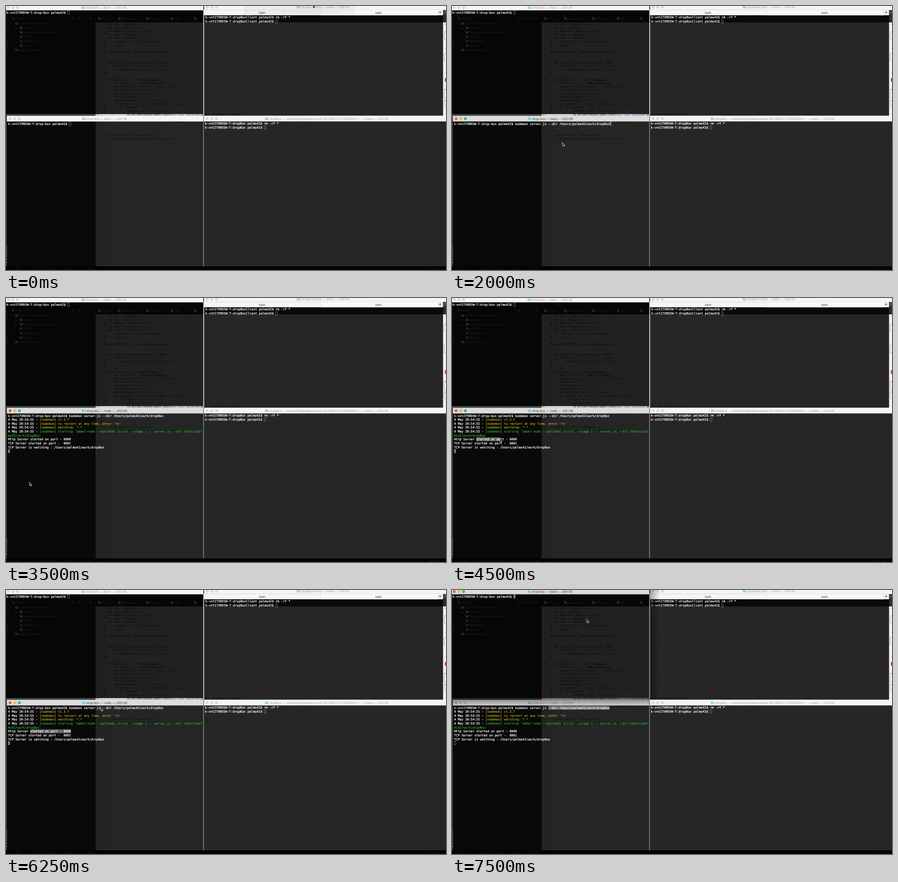
Write an HTML page that moves like this. It is 967 by 579 pixels and loops after 8000 ms.

```html
<!DOCTYPE html>
<html lang="en">
<head>
<meta charset="utf-8">
<title>Terminals</title>
<style>
html, body { margin: 0; width: 100%; height: 100%; overflow: hidden; background: #000; }
svg { display: block; width: 967px; height: 579px; }
text { white-space: pre; text-rendering: geometricPrecision; }
.term { font: 6.754px "DejaVu Sans Mono", monospace; fill: #fff; }
.white { stroke: #fff; stroke-width: .22px; }
.code { font: 5.9px "DejaVu Sans Mono", monospace; fill: #060606; }
.ui { font: 7.05px "Liberation Sans", Arial, sans-serif; }
.tree { font: 5.8px "Liberation Sans", Arial, sans-serif; fill: #222; }
</style>
</head>
<body>
<svg viewBox="0 0 967 579" xmlns="http://www.w3.org/2000/svg">
  <defs>
    <linearGradient id="shadeDown" x2="0" y2="1">
      <stop offset="0" stop-opacity=".5"/><stop offset="1" stop-opacity="0"/>
    </linearGradient>
    <linearGradient id="shadeRight">
      <stop offset="0" stop-opacity=".35"/><stop offset="1" stop-opacity="0"/>
    </linearGradient>
  </defs>
  <g id="desk"></g>
  <g id="live"></g>
</svg>
<script>
const LOOP = 8000, STEP = 250;
const CW = 4.066, ROW = 8.65, CODE_ROW = 7.594;
const USER = 'pelmo42', HOST = 'k-vnt27XRD5W-T';
const prompt = dir => `${HOST}:${dir} ${USER}$ `;

const esc = s => s.replace(/&/g, '&amp;').replace(/</g, '&lt;');
const rect = (x, y, w, h, fill, extra = '') =>
  `<rect x="${x}" y="${y}" width="${w}" height="${h}" fill="${fill}" ${extra}/>`;
const text = (x, y, cls, s, extra = '') =>
  `<text x="${x}" y="${y}" class="${cls}" ${extra}>${esc(s)}</text>`;
const dot = (x, y, r, fill, extra = '') =>
  `<circle cx="${x}" cy="${y}" r="${r}" fill="${fill}" ${extra}/>`;

// ---- editor showing through the terminals ----
const CODE = `let net = require('net');
let fs = require('fs');
let mkdirp = require('mkdirp');
let path = require('path');
let argv = require('yargs')
    .default('dir', process.cwd())
    .argv;

const ROOT_DIR = path.resolve(argv.dir);


var client = net.connect({port: 8001},
    function() { //'connect' listener
        console.log('connected to server!')

    });
client.on('data', function(data) {
    let dataJson =  JSON.parse(data);
    console.log('Received' +  dataJson.path);
    let action = dataJson.action;
    let type = dataJson.type;
    console.log(dataJson);
    console.log(dataJson.contents);
    if (action == 'create' || action == 'change') {
        if (type == 'file') {
            console.log("I am here");
            fs.writeFileSync(path.join(ROOT_DIR, dataJson.path), dataJson.contents)


        }
    }
});
client.on('end', function() {
    console.log('disconnected from server')
});`.split('\n');

const TOKENS = [
  [/^\/\/.*/, '#161616'],
  [/^(['"]).*?\1/, '#07150b'],
  [/^(let|const|var|function|if)\b/, '#050512'],
  [/^dataJson(\.\w+)?/, '#101022'],
  [/^(\w+|\s+|.)/, '']
];

function highlight(line) {
  let out = '';
  while (line) {
    const [re, color] = TOKENS.find(([r]) => r.test(line));
    const word = line.match(re)[0];
    out += color ? `<tspan fill="${color}">${esc(word)}</tspan>` : esc(word);
    line = line.slice(word.length);
  }
  return out;
}

function editor() {
  let s = '';
  CODE.forEach((line, i) => {
    const y = (42 + i * CODE_ROW).toFixed(2);
    if (i === 27 || i === 28) return;
    s += text(206, y, 'code', String(i + 1), 'text-anchor="end" style="fill:#3c1316"');
    if (i !== 26) s += `<text x="223" y="${y}" class="code">${highlight(line)}</text>`;
  });
  const [a, b] = CODE[26].split('ROOT_DIR');
  const [c, d] = b.split('dataJson.path');
  s += `<text x="223" y="239.5" class="code">${a}<tspan fill="#5b4a9c">ROOT_DIR</tspan>${c}` +
       `<tspan fill="#3c4a8c">dataJson</tspan>.path${d}</text>`;
  s += rect(318, 164, 16, .5, '#050505') + rect(334, 171.6, 15, .5, '#050505');
  [20, 47, 62, 108, 187].forEach(y => s += rect(217, y + 35, 3, 7, '#141414'));
  s += text(361, 255, 'code', 'contents)');
  return s;
}

function projectTree() {
  const items = ['drop-box (~/work/drop-box)', '.settings', 'node_modules (library home)',
    'client.js', 'package.json', 'server.js', 'External Libraries'];
  const icons = ['#262626', '#262626', '#262626', '#2b1c0c', '#10202b', '#2b1c0c', '#262626'];
  let s = '';
  items.forEach((name, i) => {
    const y = 38.3 + i * 9.7, x = i === 0 || i === 6 ? 20 : 30;
    s += rect(x, y - 2.4, 6.5, 5, icons[i], 'rx="1"') + text(x + 8.5, y + 2, 'tree', name);
    if (i < 3) s += text(x - 10, y + 2, 'tree', i ? '▶' : '▼', 'style="font-size:4.5px"');
  });
  [148, 160, 174, 186].forEach(x =>
    s += dot(x, 27, 2.2, 'none', 'stroke="#262626" stroke-width=".8"'));
  s += rect(13, 25, 5, 4, '#222') + text(21, 29, 'tree', 'Project');
  const tabs = ['client.js', 'package.json', 'server.js', 'util.js'];
  [202, 246, 308, 362, 413].forEach((x, i) =>
    s += rect(x, 24.5, 6, 6, '#2c220f') + text(x + 8, 29.5, 'tree', tabs[i] || ''));
  s += text(0, 0, 'tree', '1: Project', 'transform="translate(5 52) rotate(-90)"');
  s += text(0, 0, 'tree', '7: Structure', 'transform="translate(5 105) rotate(-90)"');
  return s;
}

function desk() {
  let s = rect(0, 0, 967, 579, '#040404');
  // top left
  s += rect(0, 8, 434, 229, '#060606') + rect(197, 36, 237, 201, '#212121') + rect(197, 36, 23, 201, '#1f1f1f');
  s += rect(0, 237, 197, 5, '#4a4a4a') + rect(197, 237, 237, 5, '#d2d2d2');
  // bottom left
  s += rect(0, 242, 1.6, 329, '#4a4a4a');
  s += rect(2, 252, 195, 319, '#090909') + rect(197, 252, 237, 319, '#252525') + rect(197, 252, 24, 319, '#232323');
  // right
  s += rect(435, 20, 525.5, 16, '#0a0a0a') + rect(435, 36, 525.5, 205, '#262626');
  s += rect(435, 252, 532, 319, '#262626');
  s += rect(960.5, 8, 6.5, 28, '#2a2a2a') + dot(965, 14, 2.5, 'none', 'stroke="#999"');
  s += rect(960.5, 36, 6.5, 205, '#f1f1f1');
  [[39, '#d9a04a'], [56, '#c9b34a'], [93, '#d8c36a'], [146, '#d9b85a'], [182, '#c080c0'], [205, '#c08fd0'], [222, '#c9b34a']]
    .forEach(([y, c]) => s += rect(964, y, 3, 1.2, c));
  [[60, 12], [104, 16], [183, 18], [208, 10]].forEach(([y, h]) =>
    s += rect(963, y, 6, h, 'none', 'stroke="#8a8a8a" stroke-width=".7"'));
  s += rect(964.5, 158, 2.5, 8, '#d8322c') + rect(965, 280, 2, 8, '#4a1014');
  s += editor() + projectTree();
  s += rect(433.6, 8, 1.8, 232, '#dedede') + rect(433.4, 253, 1.5, 318, '#8f8f8f');
  // bottom edge
  s += rect(0, 571, 967, 8, '#030303');
  [[16, '4: Run'], [60, '6: TODO   Terminal'], [130, 'Version'], [174, '9: Log'], [926, 'Event Log']]
    .forEach(([x, w]) => s += text(x, 578, 'tree', w));
  s += text(0, 0, 'tree', '2: Favorites', 'transform="translate(3 557) rotate(-90)" style="fill:#666"');
  s += rect(0, 560.5, 2, 3, '#c87a20');
  // right title bars and tabs
  s += titleBar(435.2, -4, 531.8, 12.8, 442, 2.5, 639, 'dropBoxClient — bash — 128×26');
  s += rect(435.2, 8.8, 525.3, 11.5, '#f5f5f5') + rect(691.5, 8.8, 257, 11.5, '#f9f9f9');
  s += rect(691.3, 8.8, .6, 11.5, '#d2d2d2') + rect(948, 8.8, .6, 11.5, '#d2d2d2');
  [563, 819].forEach(x => s += text(x, 16.5, 'ui', 'bash', 'text-anchor="middle" style="font-size:6.4px" fill="#333"'));
  s += rect(951.2, 13.5, 5.6, .9, '#333') + rect(953.55, 11.1, .9, 5.6, '#333');
  s += titleBar(434.6, 240.5, 532.4, 12.6, 442, 247, 569,
    `dropBox — ${USER}@gridqueuehost-20746513-27-60382947:~ — bash — 131×38`);
  // right prompts
  const client = prompt('dropBoxClient'), server = prompt('dropBox');
  s += text(438, 27.4, 'term white', client + 'rm -rf *') + text(438, 36.1, 'term white', client);
  s += caret(438 + client.length * CW, 29.6, false);
  s += text(437, 260.3, 'term white', server + 'rm -rf *') + text(437, 268.9, 'term white', server);
  s += caret(437 + server.length * CW, 262.4, false);
  return s;
}

// ---- window parts ----
function titleBar(x, y, w, h, lightX, midY, iconX, label, active, running) {
  let s = rect(x, y, w, h, active ? '#dcdcdc' : '#f5f5f5');
  s += rect(x, y + h - .5, w, .5, active ? '#b4b4b4' : '#dcdcdc');
  ['#fb5b55', '#f9bd32', '#32c644'].forEach((c, i) =>
    s += dot(lightX + i * 10.2, midY, 2.9, active ? c : '#dadada',
      `stroke="${active ? '#0003' : '#cbcbcb'}" stroke-width=".4"`));
  if (running) s += dot(lightX, midY, 1, active ? '#6b0f0c' : '#555');
  s += `<g opacity="${active ? 1 : .75}">` + rect(iconX, midY - 2.6, 4, 2, '#62bbe6') +
    rect(iconX, midY - 1.9, 8, 5, '#79cdf2', 'rx=".5"') + '</g>';
  return s + text(iconX + 10, midY + 2.5, 'ui', label, `fill="${active ? '#444' : '#a3a3a3'}"`);
}

const caret = (x, y, solid) => solid
  ? rect(x, y, 4.1, 8.4, '#808080')
  : rect(x + .4, y + .4, 3.6, 7.8, 'none', 'stroke="#8c8c8c" stroke-width=".7"');

const mouse = (x, y) => `<path d="M0 0V7.2L1.7 5.7L2.9 8.5L4.3 7.9L3.1 5.2H5.4Z" transform="translate(${x} ${y})"
  fill="#000" stroke="#fff" stroke-width=".8" stroke-linejoin="round"/>`;

// ---- what happens when ----
const MOUSE = [[0, 675, -2], [250, 470, 75], [500, 261, 160], [1000, 246, 250], [1250, 242.5, 299.5],
  [2750, 200, 332], [3000, 130, 372], [3250, 68, 400], [3500, 51.5, 404], [3750, 46, 370], [4000, 41, 322],
  [4250, 53, 307], [4500, 105, 308], [4750, 155, 307], [5000, 160, 303], [5250, 175.5, 288],
  [5500, 200, 272], [5750, 232, 262], [6000, 250, 260], [6250, 208, 257.5], [6500, 282, 258],
  [6750, 358, 258], [7250, 296, 64]];
const ROWS = [[0, 1], [2750, 4], [3000, 6], [3250, 8], [3500, 9]];
// time, row, first column, last column
const MARKS = [[0, 0, 0, 0], [4500, 6, 12, 25], [4750, 6, 12, 34], [6500, 0, 51, 66], [6750, 0, 51, 84]];
const at = (list, t) => list.filter(e => e[0] <= t).pop();

const SHELL = prompt('drop-box');
const COMMAND = `bodemon server.js --dir /Users/${USER}/work/dropBox`;
const STAMP = '4 May 20:54:55 - ';
const YELLOW = '#c9bf1e', GREEN = '#25c72b';
const launch = `[nodemon] starting \`babel-node --optional strict --stage 1 -- server.js --dir /Users/${USER}/work/dropBox\``;
const fold = 105 - STAMP.length;
// plain part, coloured part, colour
const OUTPUT = [
  [SHELL + COMMAND],
  [STAMP, '[nodemon] v1.3.7', YELLOW],
  [STAMP, "[nodemon] to restart at any time, enter 'rs'", YELLOW],
  [STAMP, '[nodemon] watching: *.*', YELLOW],
  [STAMP, launch.slice(0, fold), GREEN],
  ['', launch.slice(fold), GREEN],
  ['Http Server started on port - 8000'],
  ['TCP Server started on port -  8001'],
  [`TCP Server is watching : /Users/${USER}/work/dropBox`]
];

function serverWindow(t) {
  const x0 = 4.5, top = 253.7, active = t >= 1000 && t < 7250, running = t >= 2500;
  const [, row, from, to] = at(MARKS, t);
  const rows = at(ROWS, t)[1];
  let s = titleBar(2, 240.9, 431.8, 12.3, 9, 247.2, 167,
    `drop-box — ${running ? 'node' : 'bash'} — 105×38`, active, running);
  if (to > from)
    s += rect(x0 + from * CW, top + row * ROW, (to - from) * CW, ROW, row ? '#626262' : '#757575');
  const caretCol = running ? 0 : SHELL.length + (t >= 2000 ? COMMAND.length : 0);
  s += caret(x0 + caretCol * CW, top + (running ? rows : 0) * ROW, active);
  OUTPUT.slice(0, rows).forEach(([plain, tinted, color], i) => {
    const y = top + 6.8 + i * ROW;
    if (i === 0 && t < 2000) plain = SHELL;
    s += text(x0, y, 'term white', plain);
    if (tinted) s += text(x0 + plain.length * CW, y, 'term', tinted,
      `style="fill:${color};stroke:${color};stroke-width:.1px"`);
  });
  return s;
}

function clientWindow(t) {
  const active = t >= 7500;
  const shade = rect(0, 237, 434, 24, 'url(#shadeDown)') + rect(434, 0, 22, 240, 'url(#shadeRight)');
  return (active ? shade : '') +
    titleBar(-1.5, -3, 435.2, 12.3, 5, 3.5, 166, 'drop-box — bash — 106×26', active) +
    text(1, 16.7, 'term white', SHELL) + caret(1 + SHELL.length * CW, 10, active);
}

const recordHint = () => rect(522, 0, 245, 28, '#000', 'opacity=".035"') +
  text(603, 15, 'ui', "Click up here when you're ready to record!", 'fill="#d3d3d3"');

function scene(t) {
  const [, mx, my] = at(MOUSE, t);
  return serverWindow(t) + clientWindow(t) + (t < 250 ? recordHint() : '') + mouse(mx, my);
}

document.getElementById('desk').innerHTML = desk();
const live = document.getElementById('live');
const start = performance.now();
let shown = -1;

function tick(now) {
  const t = Math.floor((Math.max(0, now - start) % LOOP) / STEP) * STEP;
  if (t !== shown) live.innerHTML = scene(shown = t);
  requestAnimationFrame(tick);
}
tick(start);
</script>
</body>
</html>
```
